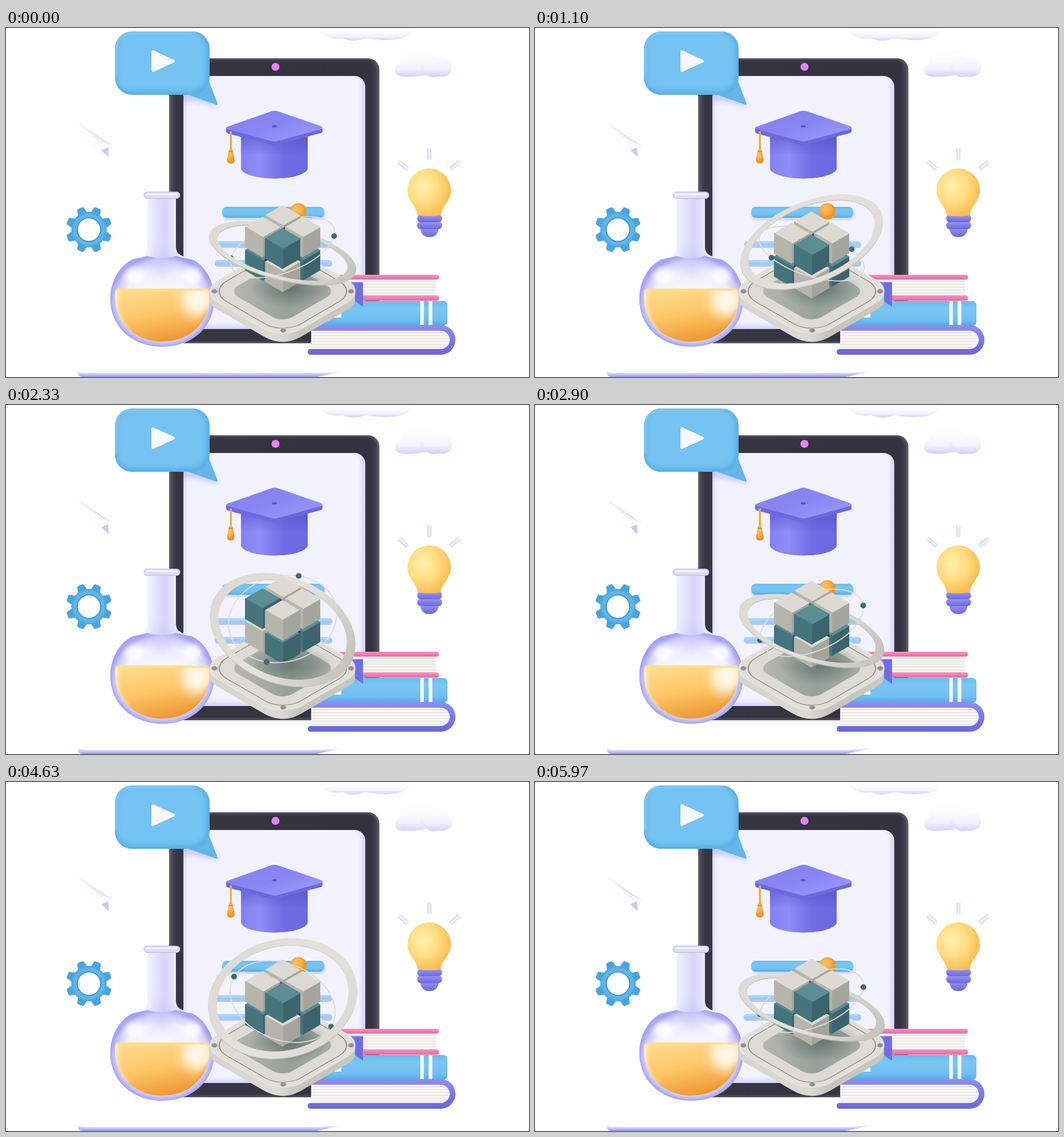
Recreate the animation shown at these times as an HTML page with a canvas. Size 917x611 px, loop 6.01 s.

```html
<!DOCTYPE html>
<html lang="en">
<head>
<meta charset="utf-8">
<title>Learning illustration</title>
<style>
  html, body { margin: 0; width: 100%; height: 100%; overflow: hidden; background: #fff; }
  svg, canvas { position: absolute; left: 0; top: 0; width: 917px; height: 611px; display: block; }
</style>
</head>
<body>
<svg viewBox="0 0 917 611" width="917" height="611">
  <defs>
    <filter id="b2" x="-30%" y="-30%" width="160%" height="160%"><feGaussianBlur stdDeviation="2"/></filter>
    <filter id="b5" x="-40%" y="-40%" width="180%" height="180%"><feGaussianBlur stdDeviation="5"/></filter>
    <filter id="b10" x="-60%" y="-60%" width="220%" height="220%"><feGaussianBlur stdDeviation="10"/></filter>
    <linearGradient id="frame"><stop offset="0" stop-color="#50505f"/><stop offset=".035" stop-color="#363642"/><stop offset=".96" stop-color="#33333f"/><stop offset="1" stop-color="#4a4a59"/></linearGradient>
    <linearGradient id="board" x1="0" x2="1" y1="0" y2="1"><stop offset="0" stop-color="#8480ef"/><stop offset=".5" stop-color="#8986f3"/><stop offset="1" stop-color="#a09cfb"/></linearGradient>
    <linearGradient id="capBody"><stop offset="0" stop-color="#8581f0"/><stop offset=".28" stop-color="#8f8bf7"/><stop offset=".65" stop-color="#6f6be2"/><stop offset="1" stop-color="#6d69e0"/></linearGradient>
    <linearGradient id="capShade" x1="0" x2="0" y1="0" y2="1"><stop offset="0" stop-color="#4b47b8" stop-opacity=".6"/><stop offset=".5" stop-color="#4b47b8" stop-opacity="0"/></linearGradient>
    <linearGradient id="blue" x1="0" x2="0" y1="0" y2="1"><stop offset="0" stop-color="#68bdec"/><stop offset=".3" stop-color="#79c6f3"/><stop offset=".75" stop-color="#70c0f1"/><stop offset="1" stop-color="#55a9e3"/></linearGradient>
    <linearGradient id="pale" x1="0" x2="0" y1="0" y2="1"><stop offset="0" stop-color="#b5daf8"/><stop offset=".55" stop-color="#9ccbf4"/><stop offset="1" stop-color="#bdc7f5"/></linearGradient>
    <radialGradient id="orange" cx=".4" cy=".35"><stop offset="0" stop-color="#ffc062"/><stop offset=".7" stop-color="#f7aa3d"/><stop offset="1" stop-color="#eb962b"/></radialGradient>
    <linearGradient id="neck"><stop offset="0" stop-color="#b9b7f6"/><stop offset=".14" stop-color="#e4e3fd"/><stop offset=".3" stop-color="#fbfbff"/><stop offset=".52" stop-color="#d6d5fa"/><stop offset=".75" stop-color="#fafaff"/><stop offset="1" stop-color="#b3b1f4"/></linearGradient>
    <radialGradient id="glass"><stop offset="0" stop-color="#fafaff"/><stop offset=".72" stop-color="#f0f0ff"/><stop offset=".9" stop-color="#cfcdfa"/><stop offset="1" stop-color="#a5a3f1"/></radialGradient>
    <linearGradient id="liquid" x1=".2" x2=".55" y1="0" y2="1"><stop offset="0" stop-color="#ffdc8c"/><stop offset=".5" stop-color="#fdc667"/><stop offset="1" stop-color="#ee9833"/></linearGradient>
    <radialGradient id="bulb" cx=".36" cy=".38" r=".68"><stop offset="0" stop-color="#fff0b0"/><stop offset=".5" stop-color="#ffdd80"/><stop offset="1" stop-color="#f9b94d"/></radialGradient>
    <linearGradient id="socket" x1="0" x2="0" y1="0" y2="1"><stop offset="0" stop-color="#9a97f7"/><stop offset="1" stop-color="#6c68d9"/></linearGradient>
    <linearGradient id="cloud" x1="0" x2="0" y1="0" y2="1"><stop offset=".25" stop-color="#fdfdff"/><stop offset=".7" stop-color="#f0f0ff"/><stop offset="1" stop-color="#d2d0fa"/></linearGradient>
    <linearGradient id="ray"><stop offset="0" stop-color="#cccbf8"/><stop offset=".5" stop-color="#f6f6ff"/><stop offset="1" stop-color="#d6d5fa"/></linearGradient>
    <linearGradient id="pink" x1="0" x2="0" y1="0" y2="1"><stop offset="0" stop-color="#f793c1"/><stop offset="1" stop-color="#e768a2"/></linearGradient>
    <linearGradient id="violet" x1="0" x2="0" y1="0" y2="1"><stop offset="0" stop-color="#8f8cf4"/><stop offset="1" stop-color="#6966dc"/></linearGradient>
    <pattern id="pages" width="10" height="5" patternUnits="userSpaceOnUse"><rect width="10" height="5" fill="#faf7f4"/><rect y="3" width="10" height="1.3" fill="#e2dcd8"/></pattern>
    <linearGradient id="floor" x1="0" x2="0" y1="0" y2="1"><stop offset="0" stop-color="#fff"/><stop offset=".5" stop-color="#dddcfb"/><stop offset="1" stop-color="#9a98ee"/></linearGradient>
    <linearGradient id="side" gradientUnits="userSpaceOnUse" x1="358" x2="612" y1="0" y2="0"><stop offset="0" stop-color="#d6d4cd"/><stop offset=".48" stop-color="#dcdad3"/><stop offset=".62" stop-color="#c6c4bc"/><stop offset="1" stop-color="#cac8c0"/></linearGradient>
    <linearGradient id="panel" x1="0" x2="1" y1="1" y2="0"><stop offset="0" stop-color="#b7bab1"/><stop offset=".55" stop-color="#98a099"/><stop offset="1" stop-color="#aab0a9"/></linearGradient>
    <clipPath id="tabletClip"><rect id="tablet" x="286" y="53" width="368.500" height="499" rx="20"/></clipPath>
    <clipPath id="screenClip"><rect id="screen" x="311" y="84" width="319" height="443" rx="19"/></clipPath>
    <clipPath id="bubbleClip"><rect id="bubble" x="191" y="6" width="166" height="111" rx="30"/></clipPath>
    <clipPath id="liquidClip"><path id="liq" d="M191.500 462Q192 456 197 456H351Q356 456 356.500 462C361 510 326 549 274 549S187 510 191.500 462Z"/></clipPath>
    <!-- the bottom edge of the side, in the platform's slanted square -->
    <clipPath id="sideClip"><path d="M350 461H620V560H350Z"/></clipPath>
  </defs>

  <!-- clouds -->
  <path d="M549 0C552 14 568 21 590 18Q608 26 630 18Q660 23 684 20Q708 17 711 0Z" fill="url(#cloud)"/>
  <path d="M694 85C679 84 678 66 692 62C690 48 706 37 722 41C737 34 752 41 754 54C768 47 783 59 782 70C782 82 770 87 756 85Q746 88 737 82Q716 87 694 85Z" fill="url(#cloud)"/>
  <path d="M738 82Q727 76 730 66" fill="none" stroke="#e3e2fc" stroke-width="3" filter="url(#b2)"/>

  <!-- paper plane -->
  <path d="M126 166L189 208L152 211Z" fill="#fdfdff"/>
  <path d="M126 166L188 207L158 193Z" fill="#dddcf9"/>
  <path d="M126 166L172 200L168 203Z" fill="#f1f1fe"/>
  <path d="M167 214L179 209L180 226Z" fill="#c3caf5"/>

  <path d="M126 597Q127 604 136 604H520Q565 604 590 601L545 611H135Q126 611 126 603Z" fill="url(#floor)"/>

  <!-- gear -->
  <g transform="translate(145.500 353)">
    <g id="teeth" fill="#49a4de"></g>
    <circle r="25.500" fill="none" stroke="#4ba7e0" stroke-width="11"/>
    <circle r="25" fill="none" stroke="#70bfee" stroke-width="4" filter="url(#b2)"/>
    <circle r="20.500" fill="none" stroke="#398fca" stroke-width="1.500"/>
  </g>

  <!-- tablet -->
  <use href="#tablet" fill="url(#frame)"/>
  <g clip-path="url(#tabletClip)"><use href="#tablet" fill="none" stroke="#666678" stroke-width="4" filter="url(#b2)"/></g>
  <use href="#screen" fill="#f2f2ff"/>
  <g clip-path="url(#screenClip)">
    <rect x="308" y="74" width="322" height="453" rx="22" fill="none" stroke="#b4b2f3" stroke-width="6" filter="url(#b5)"/>
    <path d="M300 110H352L375 138L330 128H300Z" fill="#a8b4f2" opacity=".6" filter="url(#b5)"/>
  </g>
  <circle cx="472.500" cy="68" r="7" fill="#e881f3"/>

  <!-- cap -->
  <g>
    <path id="capSide" d="M412 180V245A58.500 18.500 0 0 0 529 245V180Z" fill="url(#capBody)"/>
    <use href="#capSide" style="fill:url(#capShade)"/>
    <path d="M412 180V245A58.500 18.500 0 0 0 529 245V180Z" fill="url(#capShade)"/>
  </g>
  <path d="M386 174V182Q387 184 390 185L466 205Q471 206 476 204L552 184Q555 183 555 181V174Z" fill="#6c68e0"/>
  <path d="M388 173L466 145.500Q471 144 476 145.500L553 172Q557 175 553 177L476 198Q471 199.500 466 198L388 177Q384 175 388 173Z" fill="url(#board)"/>
  <ellipse cx="470.500" cy="172" rx="4.500" ry="2" fill="#5b57bd"/>
  <rect x="392.500" y="181" width="3.600" height="33" fill="#f3ab39"/>
  <path d="M391 213Q394 210 397 213L401 231Q401 237 394.500 237.500Q387 237 387.500 231Z" fill="url(#orange)"/>
  <path d="M390.500 216H398" stroke="#d4851f" stroke-width="1.500"/>

  <!-- screen lines -->
  <rect x="380" y="316" width="179" height="19" rx="8" fill="#aab9f0" opacity=".7" filter="url(#b2)"/>
  <rect x="379" y="313" width="179" height="19" rx="8" fill="url(#blue)"/>
  <circle cx="512.500" cy="321" r="14.500" fill="url(#orange)"/>
  <rect x="367" y="373" width="205" height="12" rx="5.500" fill="url(#pale)"/>
  <rect x="366" y="406" width="206" height="12" rx="5.500" fill="url(#pale)"/>

  <!-- bubble -->
  <path d="M314 115L368 134Q372 135.500 370.500 131L354 88Z" fill="#64b5e8"/>
  <use href="#bubble" fill="#74c3f2"/>
  <g clip-path="url(#bubbleClip)">
    <rect x="188" y="2" width="168" height="114" rx="32" fill="none" stroke="#4ba2dc" stroke-width="7" filter="url(#b5)"/>
    <path d="M193 85V36Q193 8 222 8H330" fill="none" stroke="#8fd2f8" stroke-width="3" filter="url(#b2)"/>
  </g>
  <path d="M259 41L294 58L259 75Z" fill="#4f9fd8" opacity=".4" filter="url(#b2)"/>
  <path d="M257.500 41.500L293.500 58L257.500 74.500Z" fill="#f8f9ff" stroke="#f8f9ff" stroke-width="5" stroke-linejoin="round"/>

  <!-- bulb -->
  <rect x="738.500" y="210" width="7.500" height="22" rx="3.700" fill="url(#ray)"/>
  <rect x="-3.700" y="-11.500" width="7.400" height="23" rx="3.700" fill="url(#ray)" transform="translate(696.500 240.500) rotate(-50)"/>
  <rect x="-3.700" y="-11.500" width="7.400" height="23" rx="3.700" fill="url(#ray)" transform="translate(787 240.500) rotate(50)"/>
  <path d="M726 348H759Q758 366 742.500 366T726 348Z" fill="url(#socket)"/>
  <rect x="721" y="339" width="43.500" height="13" rx="6" fill="url(#socket)"/>
  <rect x="721" y="327" width="43.500" height="13" rx="6" fill="url(#socket)"/>
  <path d="M742 246C763 246 780 263 780 284C780 304 764 311 762 328Q742 331 722 328C720 311 704 304 704 284C704 263 721 246 742 246Z" fill="url(#bulb)"/>

  <!-- books -->
  <rect x="560" y="440" width="194" height="29" fill="url(#pages)"/>
  <rect x="540" y="432" width="219" height="8.500" rx="4" fill="url(#pink)"/>
  <rect x="540" y="468" width="219" height="9.500" rx="4" fill="url(#pink)"/>
  <rect x="500" y="478" width="274" height="43" rx="7" fill="url(#blue)"/>
  <rect x="726.500" y="478" width="6" height="42.500" fill="#fff"/>
  <rect x="741" y="478" width="6.500" height="42.500" fill="#fff"/>
  <rect x="560" y="500" width="28" height="7" fill="#f7f9ff"/>
  <path d="M596 445H626V488L611 477L596 488Z" fill="#7e7bec"/>
  <path d="M612 445H626V488L612 478Z" fill="#716de0"/>
  <path d="M535 528H760Q777 529 777 546T760 564H535Z" fill="url(#pages)"/>
  <path d="M520 520H762A26 26 0 0 1 762 572H534Q529 572 529 567T534 562H762A16 16 0 0 0 762 530H520Z" fill="url(#violet)"/>

  <!-- flask -->
  <path d="M248 296V384C247 400 235 399 222 405C198 416 183 445 183 474C183 524 222 558 274 558S365 524 365 474C365 445 350 416 326 405C313 399 299 400 298 384V296Z" fill="url(#neck)"/>
  <path d="M248 399Q237 402 222 405C198 416 183 445 183 474C183 524 222 558 274 558S365 524 365 474C365 445 350 416 326 405Q309 402 298 399Q273 407 248 399Z" fill="url(#glass)"/>
  <ellipse cx="274" cy="412" rx="22" ry="20" fill="#c6c4f8" opacity=".6" filter="url(#b10)"/>
  <ellipse cx="225" cy="434" rx="17" ry="14" fill="#fff" opacity=".8" filter="url(#b5)"/>
  <ellipse cx="327" cy="433" rx="16" ry="14" fill="#fff" opacity=".8" filter="url(#b5)"/>
  <use href="#liq" fill="url(#liquid)"/>
  <g clip-path="url(#liquidClip)">
    <path d="M190 455V490Q194 520 212 533" fill="none" stroke="#fff0cf" stroke-width="12" filter="url(#b5)"/>
    <ellipse cx="335" cy="476" rx="27" ry="29" fill="#fff8e8" filter="url(#b10)"/>
    <path d="M296 550Q350 532 358 495" fill="none" stroke="#eb9533" stroke-width="8" filter="url(#b5)"/>
    <rect x="190" y="455" width="169" height="5" fill="#fbe08f" opacity=".85"/>
  </g>
  <rect x="242" y="287" width="63" height="11.500" rx="5.500" fill="#dedcfc" stroke="#b3b1f3"/>
  <path d="M248 291H299" stroke="#f6f6ff" stroke-width="3" stroke-linecap="round"/>

  <!-- platform -->
  <g fill="url(#side)">
    <path d="M358 461H612V478H358Z"/>
    <path d="M358 478C358 485 364 489 376 496L450 539Q485 560 520 539L594 496C606 489 612 485 612 478Z"/>
  </g>
  <rect x="-85" y="-85" width="170" height="170" rx="40" fill="#e1dfd8" stroke="#efede7" transform="matrix(.866 .5 -.866 .5 485 461)"/>
  <rect x="-75" y="-75" width="150" height="150" rx="36" fill="#dddbd4" stroke="#878983" stroke-width="1.500" transform="matrix(.866 .5 -.866 .5 485.500 461)"/>
  <rect x="-55" y="-55" width="110" height="110" rx="20" fill="url(#panel)" transform="matrix(.866 .5 -.866 .5 485 461)"/>
  <g fill="#8d918b" stroke="#b5b6af">
    <ellipse cx="365.500" cy="461" rx="5" ry="3.800"/>
    <ellipse cx="605" cy="461" rx="5" ry="3.800"/>
    <ellipse cx="486" cy="529.500" rx="5" ry="3.500"/>
  </g>
</svg>
<canvas id="toy"></canvas>

<script>
const teeth = document.getElementById('teeth');
for (let i = 0; i < 8; i++) {
  const tooth = document.createElementNS('http://www.w3.org/2000/svg', 'path');
  tooth.setAttribute('d', 'M-8.500-29L-6.500-38Q-6-40.500-4-40.500H4Q6-40.500 6.500-38L8.500-29Z');
  tooth.setAttribute('transform', `rotate(${22.5 + i * 45})`);
  teeth.append(tooth);
}

const LOOP = 3005, TAU = Math.PI * 2, CX = 485;
const canvas = document.getElementById('toy');
const ctx = canvas.getContext('2d');
const dpr = window.devicePixelRatio || 1;
canvas.width = 917 * dpr;
canvas.height = 611 * dpr;

const wave = (t, peak) => Math.cos(TAU * (t - peak) / LOOP);

function ease(t, start, end) {
  const x = Math.min(1, Math.max(0, (t - start) / (end - start)));
  return x < .5 ? 4 * x ** 3 : 1 - (2 - 2 * x) ** 3 / 2;
}

// First the right slice makes a half turn, then the left one in two quarters.
function sliceTurn(t) {
  return t < 1500
    ? { axis: 0, angle: -Math.PI * ease(t, 110, 775) }
    : { axis: 2, angle: -Math.PI / 2 * (ease(t, 1720, 2250) + ease(t, 2400, 2870)) };
}

// face colours along x (right), y (top), z (left)
const GREY = [[164, 165, 157], [220, 218, 211], [181, 181, 172]];
const TEAL = [[60, 100, 109], [92, 140, 148], [70, 116, 125]];
const CORE = [[36, 44, 56], [66, 76, 82], [40, 49, 60]];
const DARK = [70, 78, 80];

const cubes = [];
for (const x of [-1, 1]) for (const y of [-1, 1]) for (const z of [-1, 1]) {
  const teal = y > 0 ? x + z === 2 : x !== z;
  cubes.push({ pos: [x, y, z], paint: teal ? TEAL : GREY });
}

function spin(v, { axis, angle }) {
  const i = (axis + 1) % 3, j = (axis + 2) % 3;
  const c = Math.cos(angle), s = Math.sin(angle), out = [...v];
  out[i] = v[i] * c - v[j] * s;
  out[j] = v[i] * s + v[j] * c;
  return out;
}

function project([x, y, z], cy) {
  const k = 46.8;
  return [CX + (x - z) * .7071 * k, cy + ((x + z) * .408 - y * .8165) * k];
}

function shade(paint, n) {
  const mix = [0, 1, 2].map(ch => Math.round(
    n.reduce((sum, v, i) => sum + v * v * (v > 0 ? paint[i] : DARK)[ch], 0)));
  return `rgb(${mix})`;
}

function box(centre, half, paint, turn, cy) {
  const place = v => turn ? spin(v, turn) : v;
  for (let i = 0; i < 3; i++) for (const s of [-1, 1]) {
    const normal = [0, 0, 0];
    normal[i] = s;
    const n = place(normal);
    if (n[0] + n[1] + n[2] <= .001) continue;
    ctx.beginPath();
    for (const [a, b] of [[-1, -1], [1, -1], [1, 1], [-1, 1]]) {
      const p = [...centre];
      p[i] += s * half;
      p[(i + 1) % 3] += a * half;
      p[(i + 2) % 3] += b * half;
      ctx.lineTo(...project(place(p), cy));
    }
    ctx.closePath();
    ctx.fillStyle = ctx.strokeStyle = shade(paint, n);
    ctx.lineWidth = 1.5;
    ctx.lineJoin = 'round';
    ctx.fill();
    ctx.stroke();
  }
}

function drawCube(t, cy) {
  const turn = sliceTurn(t);
  const list = cubes.map(c => {
    const moving = c.pos[turn.axis] > 0 ? turn : null;
    const [x, y, z] = moving ? spin(c.pos, turn) : c.pos;
    return { ...c, moving, depth: x + y + z };
  }).sort((a, b) => a.depth - b.depth);
  for (const front of [false, true]) {
    const layer = list.filter(c => !!c.moving === front);
    for (const c of layer) box(c.pos.map(v => v * .455), .455, CORE, c.moving, cy);
    for (const c of layer) box(c.pos.map(v => v * .53), .455, c.paint, c.moving, cy);
  }
}

// A ring whose normal sweeps a cone around the vertical, seen isometrically.
function tilt(t, start, dir) {
  const a = TAU * (t - start) / LOOP, v = .33 * Math.cos(a);
  const nx = dir * .33 * Math.sin(a);
  const ny = .771 + v * .577, nz = .545 - v * .8165;
  return { nx, ny, nz, angle: Math.atan2(nx, ny) };
}

function halfBand(o, cy, outer, inner, front) {
  const a = front ? 0 : Math.PI;
  ctx.beginPath();
  ctx.ellipse(CX, cy, outer, outer * o.nz, o.angle, a, a + Math.PI);
  ctx.ellipse(CX, cy, inner, inner * o.nz, o.angle, a + Math.PI, a, true);
  ctx.closePath();
  ctx.fill();
}

function bigRing(o, cy, front) {
  ctx.fillStyle = '#c3c1b8';
  halfBand(o, cy + 2 * o.ny, 132.5, 117.5, front);
  const g = ctx.createLinearGradient(CX - 110, cy - 60, CX + 110, cy + 70);
  g.addColorStop(0, '#dcdad3');
  g.addColorStop(.5, '#e5e2db');
  g.addColorStop(1, o.nx > 0 ? '#c5c3bb' : '#dddad3');
  ctx.fillStyle = g;
  halfBand(o, cy, 132.5, 117, front);
}

function orbit(o, cy, spinAngle, front) {
  const r = 96, a = front ? 0 : Math.PI;
  ctx.beginPath();
  ctx.ellipse(CX, cy, r, r * o.nz, o.angle, a, a + Math.PI);
  ctx.strokeStyle = '#dddcd6';
  ctx.lineWidth = 1.8;
  ctx.stroke();
  // measured from the in-plane direction nearest to screen right
  const phase = spinAngle + Math.atan2(-o.nx * o.nz, o.ny);
  for (const p of [phase, phase + Math.PI]) {
    if ((Math.sin(p) > 0) !== front) continue;
    const u = r * Math.cos(p), w = r * o.nz * Math.sin(p);
    const c = Math.cos(o.angle), s = Math.sin(o.angle);
    ctx.beginPath();
    ctx.arc(CX + u * c - w * s, cy + u * s + w * c, 5, 0, TAU);
    ctx.fillStyle = '#416b73';
    ctx.fill();
  }
}

function shadow(lift) {
  ctx.save();
  ctx.translate(499, 455);
  ctx.scale(1, .5);
  const g = ctx.createRadialGradient(0, 0, 8, 0, 0, 72);
  g.addColorStop(0, `rgba(70,90,90,${.58 + lift * .08})`);
  g.addColorStop(.5, 'rgba(85,106,103,.35)');
  g.addColorStop(1, 'rgba(95,113,109,0)');
  ctx.fillStyle = g;
  ctx.fillRect(-75, -75, 150, 150);
  ctx.restore();
}

function draw(t) {
  ctx.setTransform(dpr, 0, 0, dpr, 0, 0);
  ctx.clearRect(0, 0, 917, 611);
  const bob = wave(t, 830);
  const cubeY = 388 + 11 * bob, orbitY = 385.5 + 11 * bob;
  const ringY = 385 + 11 * wave(t, 2670);
  const ring = tilt(t, 370, -1), thin = tilt(t, 600, 1);
  const dots = TAU * (t / LOOP + 8 / 360);
  shadow(bob);
  bigRing(ring, ringY, false);
  orbit(thin, orbitY, dots, false);
  drawCube(t, cubeY);
  orbit(thin, orbitY, dots, true);
  bigRing(ring, ringY, true);
}

const begin = performance.now();
function tick() {
  draw((performance.now() - begin) % LOOP);
  requestAnimationFrame(tick);
}
tick();
</script>
</body>
</html>
```
